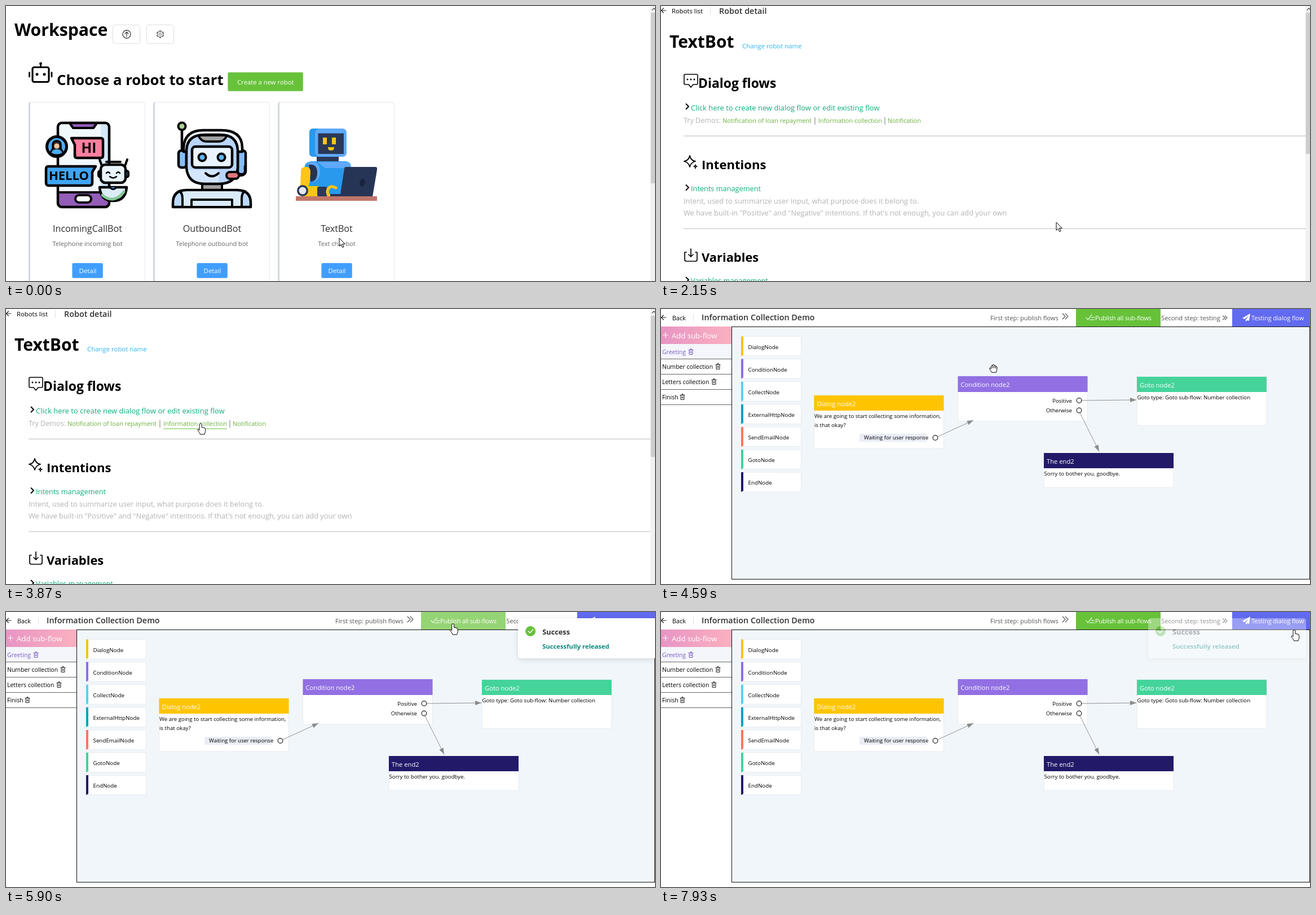
An HTML page that plays this animation: 1151x487 px, repeating every 8000 ms.

```html
<!DOCTYPE html>
<html lang="en">
<head>
<meta charset="utf-8">
<title>Robot workspace</title>
<style>
html, body { margin: 0; width: 100%; height: 100%; overflow: hidden; background: #fff; }
svg { display: block; width: 1151px; height: 487px; font-family: "Open Sans", "Noto Sans", sans-serif; }
text { white-space: pre; }
</style>
</head>
<body>
<svg id="stage" viewBox="0 0 1151 487" xmlns="http://www.w3.org/2000/svg"></svg>
<script>
const LOOP = 8000;
const GREEN = '#67c23a', GREEN_HOVER = '#95d475';
const BLUE = '#409eff', BLUE_HOVER = '#79bbff', BLUE_DOWN = '#337ecc';
const INK = '#000';

// Drawing helpers, each returns SVG markup
const text = (x, y, size, str, fill = INK, more = '') =>
  `<text x="${x}" y="${y}" font-size="${size}" fill="${fill}" ${more}>${str}</text>`;
const rect = (x, y, w, h, fill, more = '') =>
  `<rect x="${x}" y="${y}" width="${w}" height="${h}" fill="${fill}" ${more}/>`;
const disc = (x, y, r, fill, more = '') => `<circle cx="${x}" cy="${y}" r="${r}" fill="${fill}" ${more}/>`;
const line = (d, stroke = INK, width = 1, fill = 'none') =>
  `<path d="${d}" fill="${fill}" stroke="${stroke}" stroke-width="${width}" stroke-linejoin="round" stroke-linecap="round"/>`;
const shape = (d, fill) => `<path d="${d}" fill="${fill}"/>`;
const group = (id, body, more = '') => `<g id="${id}" ${more}>${body}</g>`;
const edge = (color, width = 1) => `stroke="${color}" stroke-width="${width}"`;
const BOLD = 'font-weight="700"', SEMI = 'font-weight="600"', MID = 'text-anchor="middle"', END = 'text-anchor="end"';

const scrollbar = bottom =>
  rect(1143, 0, 8, 487, '#f1f1f1') + rect(1143.5, 12, 7.5, bottom - 12, '#cdcdcd') +
  line('M1146 7l3-3 3 3', '#555', 1.3);
const backArrow = y => line(`M9 ${y}H1m3.5-4l-4 4 4 4`, '#222', 1.1);
const chevrons = (x, y, s) => line(`M${x} ${y - s}l${s} ${s}-${s} ${s}m${s}-${2 * s}l${s} ${s}-${s} ${s}`, '#555', 1.1);

function phoneArt() {
  const word = (x, y, size, str) => text(x, y, size, str, INK, `${BOLD} ${MID}`);
  return rect(92, 207, 91, 149, '#f1f8fe', 'rx="7"') + shape('M168 209h13v120h-13z', '#d3e8fa') +
    shape('M94 330h88v20q0 6-7 6H100q-6 0-6-6z', '#935db8') +
    shape('M113 207h49l-4 9h-40z', '#935db8') +
    line('M92 330h72M114 209l5 7h36l5-7', INK, 4) +
    rect(92, 207, 91, 149, 'none', 'rx="7" ' + edge(INK, 4.5)) +
    rect(123, 335, 28, 13, '#fff', 'rx="6.5" ' + edge(INK, 4)) +
    line('M116 234h52q4 0 4 4v27q0 4-4 4h-42q-4 0-4-4v-19z', INK, 4.5, '#ff7f9f') +
    word(147, 260, 24.5, 'HI') +
    disc(90, 249, 17.5, '#4cabf8', edge(INK, 5)) + line('M92 267v7', INK, 4) +
    line('M79 261q1-9 11-9t11 9q-11 6-22 0z', INK, 3, '#4cabf8') +
    line('M83 253v-7q0-7 7-7t7 7v7', INK, 3.5, '#333') + disc(90, 248, 4.6, '#ffc39b') +
    line('M75 284h84l-6 10v19q0 5-5 5H76q-5 0-5-5v-24q0-5 4-5z', INK, 4.5, '#3fa5f6') +
    word(111.5, 308, 22, 'HELLO') +
    line('M170 283l-4-11M211 283l4-11M178 276h25', INK, 4) +
    rect(164, 292, 53, 11, '#4cabf8', 'rx="3" ' + edge(INK, 4)) +
    rect(168, 281, 44, 32, '#eaf4fd', 'rx="8" ' + edge(INK, 4.5)) +
    line('M178 296q3-4 6 0m12 0q3-4 6 0M184 302q6 5 12 0', INK, 2.5) +
    line('M166 321h48q-2 24-24 24t-24-24z', INK, 4.5, '#dcecfa') +
    line('M171 335q9 8 19 7t19-13', '#86c897', 5) + line('M184 321q6 7 12 0', INK, 3, '#4cabf8');
}

function headsetArt() {
  return line('M312 219v38', INK, 4.5) + disc(312, 213, 6.5, '#a8d48e', edge(INK, 4)) +
    rect(348, 312, 35, 18, '#a2a2a2', edge(INK, 4)) +
    line('M296 356v-7q0-23 24-23h90q24 0 24 23v7z', INK, 4.5, '#bcd9fb') +
    shape('M320 328h88q11 1 11 12v14H313v-14q0-11 7-12z', '#d9ebfd') +
    line('M313 354v-13q0-10-6-13M418 354v-13q0-10 6-13M329 354v-11h72v11', INK, 4) +
    rect(306, 256, 14, 30, '#86bdf7', 'rx="5" ' + edge(INK, 4.5)) +
    rect(411, 256, 14, 42, '#86bdf7', 'rx="5" ' + edge(INK, 4.5)) +
    line('M315 258v-8q2-30 35-30h32q36 0 37 30v8z', INK, 4.5, '#eef6fd') +
    line('M320 256q1-28 32-28h28q30 0 31 28v31q-3 28-33 28h-26q-29 0-32-28z', INK, 4.5, '#b9d5fa') +
    shape('M323 290h54v22h-25q-26 0-29-22z', '#d4e6fd') +
    line('M341 229h51q-5 11-14 11h-23q-9 0-14-11z', INK, 4, '#a2a2a2') +
    rect(330, 249, 71, 37, '#eaf4fe', 'rx="6" ' + edge(INK, 4.5)) +
    disc(348, 268, 6.5, '#64b5f6', edge(INK, 4)) + disc(382, 268, 6.5, '#64b5f6', edge(INK, 4)) +
    line('M354 296q11 11 23 0', INK, 4) +
    line('M424 284v9q0 8-12 7', INK, 4.5) + rect(391, 294, 22, 12, '#e0787e', 'rx="6" ' + edge(INK, 4));
}

function laptopArt() {
  return rect(538, 217, 66, 50, '#60a9fa', 'rx="7"') + shape('M545 217h10q-7 2-7 9v32q0 7 7 9h-10q-7 0-7-7v-36q0-7 7-7z', '#2899ec') +
    rect(553.5, 225.5, 45.5, 36.5, '#2b3857') +
    rect(562, 233, 7, 12, '#fdc612') + rect(578, 233, 7, 12, '#fdc612') +
    shape('M571 250h11q0 6-5.5 6t-5.5-6z', '#fdc612') + rect(551, 267, 39, 9, '#2b3857') +
    shape('M541 275h62q9 1 9 12v51h-83v-50q1-12 12-13z', '#2899ec') +
    shape('M552 276h51q9 1 9 11h-46z', '#60a9fa') + shape('M535 276h13q9 4 9 17t-9 18h-7z', '#60a9fa') +
    shape('M537 281q15-2 15 14t-12 16z', '#26334f') +
    shape('M529 285q11-2 11 9l-1 15q0 6-4 13l-13-2 1-27q0-7 6-8z', '#fdc612') +
    rect(529, 319, 26, 18, '#fdc612') + rect(552, 320, 17, 17, '#2b3857', 'rx="2"') +
    disc(526, 327, 10, '#2b3857') + disc(526, 327, 6.5, '#e3e7ef') +
    line('M585 322q-9-5-13 1t0 12q7 5 13 1', '#fdc612', 5) +
    shape('M603 285h52q4 0 3 5l-8 48h-75v-5h18l7-45q0-3 3-3z', '#263556') +
    `<ellipse cx="632" cy="313" rx="5" ry="7" fill="#1a2541" transform="rotate(15 632 313)"/>` +
    rect(514, 337, 144, 8, '#c1766a');
}

function card(x, title, note, art, id = '') {
  const cx = x + 104.5;
  return rect(x + .5, 170.5, 206, 330, '#fff', 'rx="4" ' + edge('#e4e8ee')) +
    shape(`M${x + 4} 170q-4 0-4 4v313h3V174q0-3 1-4z`, '#d1d9e3') + art() +
    text(cx, 400, 16.15, title, '#303133', MID) + text(cx, 425, 11.05, note, '#666', MID) +
    rect(x + 77.4, 455.3, 54.4, 26.4, BLUE, `rx="2.5" ${id && `id="${id}"`}`) +
    text(cx + .5, 473, 11.4, 'Detail', '#fff', MID);
}

function workspace() {
  const tool = x => rect(x + .5, 33.5, 48, 33, '#fff', 'rx="3" ' + edge('#dcdfe6'));
  const teeth = [...Array(6)].map((_, i) =>
    `<path d="M-1.4 -4.8V-6.3H1.4V-4.8" transform="translate(273.5 50) rotate(${i * 60})" fill="none" ${edge('#555')}/>`).join('');
  return text(15, 53, 30.2, 'Workspace', INK, BOLD) + tool(189) + tool(249) +
    disc(214, 50, 7, 'none', edge('#444', 1.3)) + line('M214 54v-8m-3 3l3-3 3 3', '#444', 1.3) +
    teeth + disc(273.5, 50, 4.9, 'none', edge('#555')) + disc(273.5, 50, 2, 'none', edge('#555')) +
    rect(47, 108.5, 29, 26, 'none', 'rx="3" ' + edge(INK, 3.2)) + line('M61.5 107v-4', INK, 2.8) +
    disc(61.5, 102, 2.4, INK) + line('M41.5 118v7M81 118v7', INK, 2.8) + disc(55, 121, 2.5, INK) + disc(68, 121, 2.5, INK) +
    text(90, 140, 25.75, 'Choose a robot to start', INK, BOLD) +
    rect(393.4, 117.4, 133.4, 33.4, GREEN, 'rx="2.5"') + text(460.3, 139, 11.3, 'Create a new robot', '#fff', MID) +
    card(40, 'IncomingCallBot', 'Telephone incoming bot', phoneArt) +
    card(261, 'OutboundBot', 'Telephone outbound bot', headsetArt) +
    card(482, 'TextBot', 'Text chat bot', laptopArt, 'detail') + scrollbar(314);
}

function robotDetail() {
  const link = '#0bb07b', demo = '#6bb13c', grey = '#b3b3b3';
  const caret = y => line(`M44.5 ${y - 4.5}l4.5 4.5-4.5 4.5`, INK, 1.8);
  const rule = y => rect(40, y, 1103, 1.4, '#cdcdcd');
  return backArrow(8) + text(19, 13, 11.3, 'Robots list') + rect(87, 2, 1, 13, '#dcdfe6') +
    text(103, 14, 14.4, 'Robot detail', '#303133', SEMI) +
    text(15, 74, 30, 'TextBot', INK, BOLD) + text(144, 75, 11.4, 'Change robot name', '#2fb4f2') +
    line('M43 121h20q2 0 2 2v14q0 2-2 2h-6l-4 5-4-5h-6q-2 0-2-2v-14q0-2 2-2z', INK, 1.6) +
    [47, 53, 59].map(x => disc(x, 130, 1.5, INK)).join('') +
    text(66, 145, 22.9, 'Dialog flows', INK, BOLD) +
    caret(178) + text(53, 185, 13, 'Click here to create new dialog flow or edit existing flow', link) +
    text(40, 207, 12.6, 'Try Demos:', grey) +
    text(109, 207, 11.1, 'Notification of loan repayment', demo) + rect(272.5, 197, 1, 13, '#777') +
    text(279, 207, 11.03, 'Information collection', demo) + rect(396.5, 197, 1, 13, '#777') +
    text(402, 207, 10.95, 'Notification', demo) +
    rect(279, 211.5, 113, 1, GREEN, 'id="underInfo"') + rect(402, 211.5, 59, 1, GREEN, 'id="underNote"') +
    rule(229.5) +
    line('M51 265q2 9 10 10-8 2-10 10-2-8-10-10 8-1 10-10z', INK, 1.8) +
    line('M61 281q0 3 3 3-3 0-3 4 0-4-3-4 3 0 3-3z', INK, 1.3) +
    text(72, 289, 22.1, 'Intentions', INK, BOLD) +
    caret(321.5) + text(53, 328, 12.75, 'Intents management', link) +
    text(40, 350, 12.83, 'Intent, used to summarize user input, what purpose does it belong to.', grey) +
    text(40, 371, 12.83, 'We have built-in "Positive" and "Negative" intentions. If that\'s not enough, you can add your own', grey) +
    rule(393.5) +
    line('M45 436h-3v13q0 3 3 3h16q3 0 3-3v-13h-3M53 430v14m-4-4l4 4 4-4', INK, 1.7) +
    text(72, 453, 21.9, 'Variables', INK, BOLD) +
    caret(485) + text(53, 491, 12.75, 'Variables management', link) + scrollbar(262);
}

function flowEditor() {
  const side = [['Greeting', 80, 53], ['Number collection', 106, 101], ['Letters collection', 133, 94], ['Finish', 160, 38]];
  const kinds = [['Dialog', '#f9c313'], ['Condition', '#8d6fe0'], ['Collect', '#5cd0ea'], ['ExternalHttp', '#0a9fbd'],
    ['SendEmail', '#f9775a'], ['Goto', '#45d09a'], ['End', '#201a66']];
  const bin = (x, y, c) => line(`M${x - 4} ${y - 3}h8m-5 0v-2h2v2m-4 0v8h6v-8m-4 2.5v3m2-3v3`, c, 1);
  const node = (x, y, h, head, color, title) =>
    rect(x, y, 230, h, '#fff', edge('#e6eaee')) + rect(x, y, 230, head, color) + text(x + 5, y + 19, 11.2, title, '#fff');
  const port = (x, y) => disc(x, y, 4.3, '#fff', edge('#222', 1.2));
  const small = (x, y, str, more) => text(x, y, 9.68, str, INK, more);
  const arrow = (x1, y1, x2, y2) => {
    const turn = Math.atan2(y2 - y1, x2 - x1) * 180 / Math.PI;
    return line(`M${x1} ${y1}L${x2} ${y2}`, '#909090', 1) +
      `<path d="M0 0L-11 -4V4z" fill="#8a8a8a" transform="translate(${x2} ${y2}) rotate(${turn})"/>`;
  };
  const spokes = [...Array(8)].map((_, i) => `<path d="M0 -3V-5.5" transform="rotate(${i * 45})" opacity="${.4 + i * .07}"/>`).join('');
  const tick = 'M754 15l3 4 7-9m-4 9h9m-6-4h6';

  return backArrow(15) + text(20, 20, 10.8, 'Back') + rect(57, 9, 1, 13, '#dcdfe6') +
    text(72, 20, 14.35, 'Information Collection Demo', '#303133', SEMI) +
    group('first', text(584, 20, 11.06, 'First step: publish flows', '#555') + chevrons(712, 13, 5)) +
    rect(736, 0, 150, 31, GREEN, 'id="publish"') + line(tick, '#fff', 1.1) +
    `<g id="spinner" stroke="#dff2d5" stroke-width="1.2">${spokes}</g>` +
    text(770, 19.5, 11, 'Publish all sub-flows', '#fff', 'letter-spacing="-.2"') +
    text(887, 20, 11.2, 'Second step: testing', '#555') + chevrons(996.5, 15.5, 3.7) +
    rect(1013, 0, 138, 31, '#626aef') + shape('M1045 8l-14 8 4 2 7-6-5 7v3l3-2 3 1z', '#fff') +
    text(1047, 19.5, 10.85, 'Testing dialog flow', '#fff') +
    rect(0, 31, 125, 31, 'url(#pink)') + line('M3.5 46h9M8 41.5v9', '#fff', 1.1) + text(19, 52, 13.2, 'Add sub-flow', '#fff') +
    rect(0, 62, 125, 26, '#f4f6fc') +
    side.map(([name, y, x], i) => text(2, y, 10.5, name, i ? INK : '#7a5cbd') + bin(x, y - 4.5, i ? '#222' : '#7a5cbd') +
      rect(0, 88 + 27 * i, 125, 1, '#666')).join('') +
    rect(125.5, 31.5, 1025, 447, '#f1f6fb', edge('#111')) +
    kinds.map(([name, color], i) => {
      const y = 48.5 + i * 40.1;
      return rect(142.5, y, 106, 34.5, '#fff', edge('#e6ebf0')) +
        shape(`M142 ${y}h4v33l-4 2z`, color) + text(154.5, y + 22.3, 9.8, name + 'Node');
    }).join('') +
    node(271.5, 153, 94, 27, '#ffc400', 'Dialog node2') +
    small(272, 193, 'We are going to start collecting some information,') + small(272, 209, 'is that okay?') +
    rect(352, 221, 119, 14, '#e9edf5') + text(360, 231, 9.55, 'Waiting for user response') +
    node(526.5, 119, 80, 28, '#9270e3', 'Condition node2') +
    small(729, 165.5, 'Positive', END) + small(729, 183, 'Otherwise', END) +
    node(844, 120, 86, 27, '#44d49a', 'Goto node2') + small(844.5, 160, 'Goto type: Goto sub-flow: Number collection') +
    node(679, 255, 61, 27, '#221a68', 'The end2') + small(679.5, 295, 'Sorry to bother you. goodbye.') +
    arrow(491, 226, 554, 197) + arrow(746, 162, 843, 161) + arrow(743, 184, 777, 252) +
    port(486.5, 228) + port(741.5, 162) + port(741.5, 179.5) +
    group('toast', rect(864, 11, 280, 71, '#fff', 'rx="5" filter="url(#shadow)"') +
      disc(886, 34, 9, GREEN) + line('M882 34l3 3 5.5-6', '#fff', 1.6) +
      text(907, 40, 12.8, 'Success', '#303133', BOLD) + text(907, 65, 11.26, 'Successfully released', '#0b8a7c', BOLD));
}

const cursors = {
  arrow: 'M0 0V14.2l3.3-3 2.4 5.4 2.3-1-2.4-5.2h4.6z',
  hand: 'M-2 1.8q0-2 2-2t2 2V6.5q5 .5 6 1.5 1 1 .6 5.5-.5 3-1.6 5.5H-.5q-1-3-4.7-7.5-.2-2.5 3.2 0z',
  grab: 'M-3 14.5q-4-5.5-4-7.5 1-2 3 1V3q1.3-2 2.6 0V1.2q1.3-1.8 2.7 0V2.5q1.5-1.5 2.7 0V4.5q2-1.3 2.5.5.3 5-2 9.5zM-1.4 3v4M1.3 2.5V7M4 4v3.5'
};

const stage = document.getElementById('stage');
stage.innerHTML = `<defs>
  <linearGradient id="pink"><stop offset="0" stop-color="#e795c4"/><stop offset="1" stop-color="#fbb0c0"/></linearGradient>
  <filter id="shadow" x="-10%" y="-30%" width="120%" height="170%"><feDropShadow dx="0" dy="2" stdDeviation="5" flood-opacity=".13"/></filter>
  </defs>` + group('workspace', workspace()) + group('robot', robotDetail()) + group('flow', flowEditor()) +
  '<path id="cursor" fill="#fff" stroke="#000" stroke-width="1" stroke-linejoin="round"/>';

const el = Object.fromEntries([...stage.querySelectorAll('[id]')].map(e => [e.id, e]));
const clamp = v => Math.min(1, Math.max(0, v));
const ramp = (t, from, to) => clamp((t - from) / (to - from));
const easeOut = v => 1 - (1 - v) ** 2.4;
const show = (e, on) => e.setAttribute('display', on ? 'inline' : 'none');
const mix = (a, b, k) => '#' + [1, 3, 5].map(i => {
  const p = parseInt(a.slice(i, i + 2), 16), q = parseInt(b.slice(i, i + 2), 16);
  return Math.round(p + (q - p) * k).toString(16).padStart(2, '0');
}).join('');

// Pointer stops: time, x, y
const path = [
  [0, 591, 411], [70, 591, 411], [200, 566, 388], [330, 541, 381], [460, 530, 408], [590, 548, 448], [730, 583, 469],
  [2010, 583, 469], [2150, 701, 383], [2330, 701, 383], [2500, 660, 366], [2700, 572, 300], [2900, 462, 222],
  [3060, 378, 206.5], [3200, 355, 201], [3400, 332, 196], [3600, 345, 203],
  [4070, 345, 203], [4270, 400, 276], [4400, 478, 240], [4590, 589, 98], [4880, 758, 39], [5050, 792, 21],
  [6300, 793, 21], [6450, 830, 24], [6700, 950, 33], [7130, 1101, 35], [7500, 1123, 32], [LOOP, 1123, 32]
];
function pointer(t) {
  const i = path.findIndex(p => p[0] > t);
  const [t0, x0, y0] = path[i - 1], [t1, x1, y1] = path[i];
  const k = (t - t0) / (t1 - t0);
  return [x0 + (x1 - x0) * k, y0 + (y1 - y0) * k];
}
function pointerKind(t) {
  if (t < 2940) return 'arrow';
  if (t < 3930) return 'hand';
  if (t < 4960) return 'grab';
  return t >= 5250 && t < 5770 ? 'arrow' : 'hand';
}

function draw(t) {
  show(el.workspace, t < 1760);
  show(el.robot, t >= 1760 && t < 3930);
  show(el.flow, t >= 3930);

  const hover = mix(BLUE, BLUE_HOVER, ramp(t, 630, 730));
  el.detail.setAttribute('fill', mix(hover, BLUE_DOWN, ramp(t, 1310, 1470)));
  el.underNote.setAttribute('opacity', t >= 2950 && t < 3130 ? 1 : 0);
  el.underInfo.setAttribute('opacity', t >= 3110 ? 1 : 0);

  const busy = t >= 5250 && t < 5740;
  el.publish.setAttribute('x', busy ? 717 : 736);
  el.publish.setAttribute('width', busy ? 169 : 150);
  el.publish.setAttribute('fill', mix(GREEN, GREEN_HOVER, ramp(t, 4970, 5070) - ramp(t, 6480, 6600)));
  el.first.setAttribute('transform', `translate(${busy ? -18.5 : 0} 0)`);
  show(el.spinner, busy);
  el.spinner.setAttribute('transform', `translate(740 15) rotate(${(t - 5250) * .18})`);

  show(el.toast, t >= 5740);
  el.toast.setAttribute('transform', `translate(${280 * (1 - easeOut(ramp(t, 5740, 6040)))} 0)`);
  el.toast.setAttribute('opacity', 1 - easeOut(ramp(t, 7825, 8125)));

  const [x, y] = pointer(t);
  el.cursor.setAttribute('d', cursors[pointerKind(t)]);
  el.cursor.setAttribute('transform', `translate(${x} ${y})`);
}

function tick() {
  draw(performance.now() % LOOP);
  requestAnimationFrame(tick);
}
tick();
</script>
</body>
</html>
```
